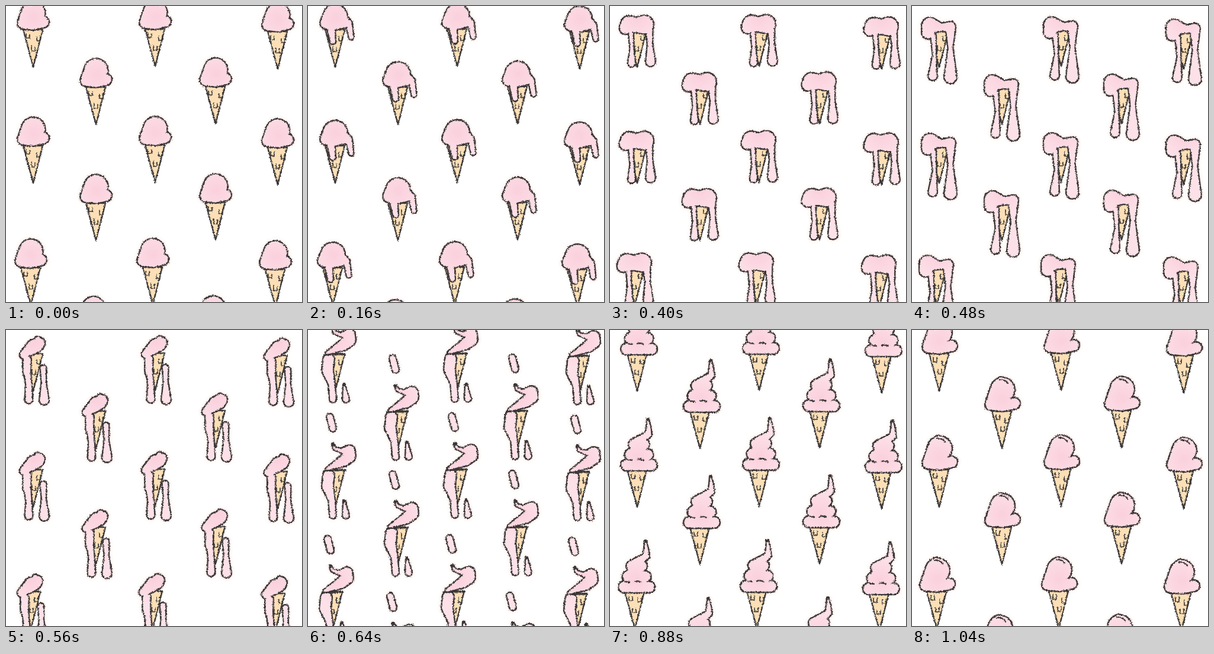
Write an HTML page that moves like this. It is 500 px wide and 500 px high and loops after 1.12 s.

```html
<!DOCTYPE html>
<html lang="en">
<head>
<meta charset="utf-8">
<title>Melting ice cream</title>
<style>
  html, body { margin: 0; width: 100%; height: 100%; overflow: hidden; background: #fff; }
  svg { display: block; width: 100vw; height: 100vh; }
  #cone, #wafer, #crease { stroke: #3b3737; stroke-width: 2.4; stroke-linejoin: round; stroke-linecap: round; }
  #wafer, #crease { fill: none; }
  #wafer { stroke-width: 1.7; }
  #cone { fill: #fcdfb6; }
  #edge { fill: #3b3737; }
  #ice { fill: url(#cream); }
  #halo { fill: #fef6f2; stroke: #fef6f2; stroke-width: 6; }
</style>
</head>
<body>
<svg viewBox="0 0 500 500">
  <defs>
    <radialGradient id="cream" gradientUnits="userSpaceOnUse" cx="53" cy="116" r="42">
      <stop offset="0" stop-color="#fad0dd"/>
      <stop offset="1" stop-color="#fde1e8"/>
    </radialGradient>
    <filter id="crayon" filterUnits="userSpaceOnUse" x="0" y="0" width="500" height="500" color-interpolation-filters="sRGB">
      <feTurbulence type="fractalNoise" baseFrequency=".45" numOctaves="2" seed="4"/>
      <feDisplacementMap in="SourceGraphic" scale="4" xChannelSelector="R" yChannelSelector="G"/>
    </filter>
    <filter id="soft" filterUnits="userSpaceOnUse" x="0" y="0" width="500" height="500">
      <feGaussianBlur stdDeviation="2"/>
    </filter>
    <path id="halo"/>
    <g id="treat">
      <path id="cone" d="M35,137L52,200L68,137Z"/>
      <path id="wafer"/>
      <path id="edge"/>
      <path id="ice"/>
      <path id="crease"/>
    </g>
  </defs>
  <g id="glow" filter="url(#soft)"></g>
  <g id="pattern" filter="url(#crayon)"></g>
</svg>
<script>
const STEP = 80, LOOP = 1120, HALF_LINE = 1.2;
const byId = id => document.getElementById(id);
const lerp = (a, b, t) => a + (b - a) * t;
const mix = (a, b, t) => a.map((v, i) => lerp(v, b[i], t));

// A strand of ice cream is a chain of discs [x, y, radius] spread between a few key discs.
function strand(keys, count) {
  return Array.from({ length: count }, (_, k) => {
    const at = k / (count - 1) * (keys.length - 1);
    const i = Math.min(Math.floor(at), keys.length - 2);
    return mix(keys[i], keys[i + 1], at - i);
  });
}
const parse = text => text.split(' ').map(disc => disc.split(',').map(Number));

// A round scoop resting on three lumps.
const scoop = (x, y, r, spread) => [
  [x, y, r], [x - spread, 126, 10], [x, 128, 10], [x + spread, 124, 10]
];

// A thin tip winding down through three widening tiers.
function softServe() {
  const discs = parse('70,52,2 71,64,4 71,77,6');
  for (let tier = 0; tier < 3; tier++) {
    const y = 94 + 17.5 * tier, reach = 8 + 6.5 * tier;
    discs.push([55 - reach, y, 10], [55 + reach, y, 10]);
  }
  return discs;
}

const TUCKED_LEFT = '45,130,4 45,132,4', TUCKED_RIGHT = '72,124,4 72,126,4';
const GONE = '72,235,0 72,240,0';

const pose = (time, body, left, right, extra = {}) => ({
  time,
  strands: [strand(body, 81), strand(parse(left), 31), strand(parse(right), 31)],
  drop: extra.drop ? strand(parse(extra.drop), 12) : [],
  crease: extra.crease || ''
});

const poses = [
  pose(0, scoop(52, 109, 20.5, 17), TUCKED_LEFT, TUCKED_RIGHT),
  pose(160, scoop(52, 115, 21, 16), '45,136,7 48,157,5', '75,126,6 79,150,4.5'),
  pose(320, parse('57,125,23 32,126,11'), '41,140,4 42,158,4 44,172,5.5', '73,136,4 76,155,5 78,165,6'),
  pose(480, parse('71,132,9 55,133,7 36,130,14 33,142,11'), '42,148,5 44,180,3.5 41,215,8', '71,133,9 71,168,4.5 71,217,11'),
  pose(640, parse('48,94,2 51,101,3 62,105,4 76,105,10 76,114,11 66,122,10 50,130,6 38,136,3'),
    '41,147,10 39,165,10 46,188,6 48,214,6', '67,190,2 70,214,6',
    { drop: '43,48,6 48,67,6', crease: 'M33,139L69,138' }),
  pose(880, softServe(), TUCKED_LEFT, GONE, { crease: 'M36,120L43,121M52,120Q57,118 63,121' }),
  pose(1040, [[50, 83, 4], ...scoop(53, 101, 21, 20)], TUCKED_LEFT, GONE, { crease: 'M48,84Q57,83 62,90' })
];

function poseAt(time) {
  const i = poses.findLastIndex(p => p.time <= time);
  const from = poses[i], to = poses[i + 1];
  if (from.time === time || !to) return from;
  const t = (time - from.time) / (to.time - from.time);
  return {
    strands: from.strands.map((s, k) => s.map((disc, j) => mix(disc, to.strands[k][j], t))),
    drop: [], crease: ''
  };
}

// Growing the discs for the line and shrinking them for the filling outlines their union.
const discPath = (discs, grow) => discs
  .map(([x, y, r]) => [x, y, r + grow])
  .filter(disc => disc[2] > Math.abs(grow) + 0.1)
  .map(disc => disc.map(v => +v.toFixed(1)))
  .map(([x, y, r]) => `M${x - r},${y}a${r},${r} 0 1 1 ${2 * r},0a${r},${r} 0 1 1 ${-2 * r},0`)
  .join('');

function randomFrom(seed) {
  return () => {
    seed = (seed * 16807 + 11) % 2147483647;
    return seed / 2147483647;
  };
}

// Three open boxes, redrawn a little differently each time.
function waferMarks(frame) {
  const random = randomFrom(frame * 7919 + 5);
  const shift = () => Math.round(random() * 3 - 1.5);
  return [[41, 144], [58, 148], [49, 165]]
    .map(([x, y]) => `M${x + shift()},${y + shift()}v${8 + shift()}h6v-${7 + shift()}`)
    .join('');
}

function copies(id) {
  let out = '';
  for (const [dx, dy] of [[0, 0], [0, 196], [-4, 402]])
    for (const [x, y] of [[-6, -97], [200, -98], [407, -94], [100, 0], [302, -1]])
      out += `<use href="#${id}" x="${x + dx}" y="${y + dy}"/>`;
  return out;
}
byId('glow').innerHTML = copies('halo');
byId('pattern').innerHTML = copies('treat');

let shown = -1;
function draw(time) {
  const frame = Math.floor(time % LOOP / STEP);
  if (frame === shown) return;
  shown = frame;
  const { strands, drop, crease } = poseAt(frame * STEP);
  const discs = [...strands.flat(), ...drop];
  const edge = discPath(discs, HALF_LINE);
  const shapes = { edge, halo: edge, ice: discPath(discs, -HALF_LINE), crease, wafer: waferMarks(frame) };
  for (const id in shapes) byId(id).setAttribute('d', shapes[id]);
}

const start = performance.now();
function tick() {
  draw(performance.now() - start);
  requestAnimationFrame(tick);
}
tick();
</script>
</body>
</html>
```
